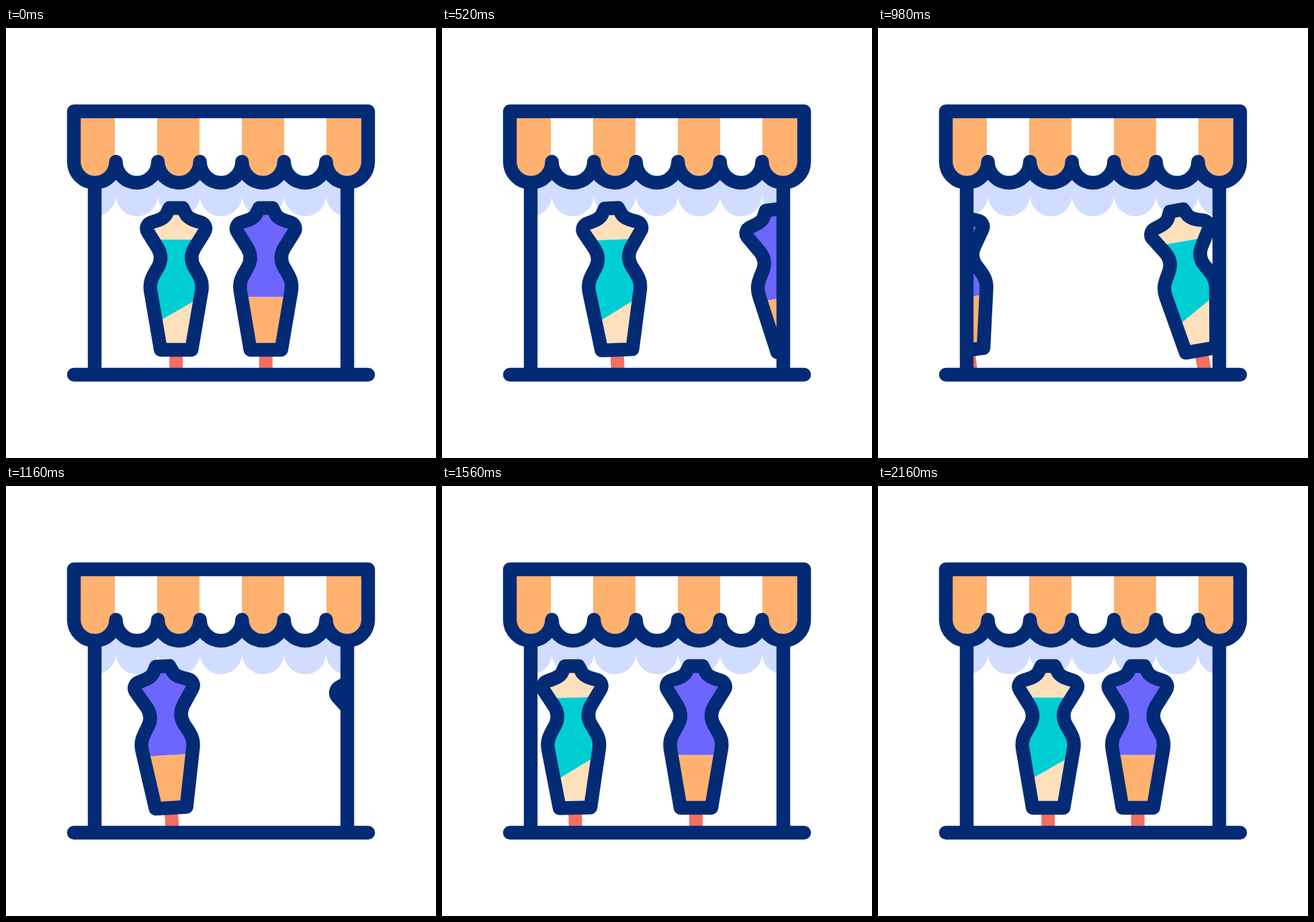
An HTML page that plays this animation: 640x640 px, repeating every 2.4 s.

```html
<!DOCTYPE html>
<html lang="en">
<head>
<meta charset="utf-8">
<title>Shop window</title>
<style>
  html, body { margin: 0; width: 100%; height: 100%; overflow: hidden; background: #fff; }
  svg { display: block; width: 100%; height: 100%; }
  .line { fill: none; stroke: #032b75; stroke-width: 20.4; stroke-linejoin: round; stroke-linecap: round; }
</style>
</head>
<body>
<svg viewBox="0 0 640 640">
  <defs>
    <path id="body" d="M-10 268H10L14 276C17 283 25 286 36 289C43 291 46 298 42 304L27 328C22 337 22 347 27 356C36 371 40 378 38 391L23 479H-23L-38 391C-40 378 -36 371 -27 356C-22 347 -22 337 -27 328L-42 304C-46 298 -43 291 -36 289C-25 286 -17 283 -14 276Z"/>
    <clipPath id="skin"><use href="#body"/></clipPath>
    <clipPath id="window"><rect x="132" y="200" width="376" height="316"/></clipPath>
  </defs>
  <g clip-path="url(#window)">
    <path id="shade" fill="#d0ddff"/>
    <g id="violet">
      <path fill="#f26f61" d="M-10 480h20v40h-20z"/>
      <g clip-path="url(#skin)">
        <path fill="#6c66fc" d="M-60 250H60V400.500H-60z"/>
        <path fill="#ffb170" d="M-60 400.500H60V490H-60z"/>
      </g>
      <use href="#body" class="line"/>
    </g>
    <g id="teal">
      <path fill="#f26f61" d="M-10 480h20v40h-20z"/>
      <g clip-path="url(#skin)">
        <path fill="#ffe0bd" d="M-60 250H60V490H-60z"/>
        <path fill="#00ced4" d="M-40 315H40V399L-40 444.500z"/>
      </g>
      <use href="#body" class="line"/>
    </g>
  </g>
  <path class="line" d="M132 235V516M508 235V516M101 516H539"/>
  <path id="canopy" fill="#fff"/>
  <path id="stripes" fill="#ffb170"/>
  <path id="edge" class="line"/>
</svg>
<script>
  const el = id => document.getElementById(id);
  const step = 438 / 7, r = step / 2;

  // Awning outline with seven scallops hanging from the given height
  const awning = y => `M101 124H539V${y}` + `a${r} ${r} 0 0 1 ${-step} 0`.repeat(7) + 'Z';
  el('shade').setAttribute('d', awning(249));
  el('canopy').setAttribute('d', awning(199));
  el('edge').setAttribute('d', awning(199));
  el('stripes').setAttribute('d', [0, 1, 2, 3].map(i =>
    `M${99 + 126 * i} 124h63v75a31.5 31.5 0 0 1 -63 0z`).join(''));

  function smooth(p) {
    p = Math.min(1, Math.max(0, p));
    return p * p * (3 - 2 * p);
  }

  // Slides out to the right, then comes back in from the left and brakes
  function pose(id, home, t, entryTime) {
    let shift, tilt;
    if (t < 930) {
      shift = 347 * smooth((t - 140) / 880);
      tilt = 10 * smooth(t / 720);
    } else {
      shift = -0.000489 * Math.max(0, 1695 - entryTime) ** 2;
      tilt = 7.3 * (1 - smooth((t - 905) / 490));
    }
    el(id).setAttribute('transform', `translate(${home + shift} 0) rotate(${-tilt} 0 506)`);
  }

  function draw() {
    const t = performance.now() % 2400;
    pose('violet', 386.7, t, t);
    pose('teal', 253.2, t - 300, t - 200);
    requestAnimationFrame(draw);
  }
  draw();
</script>
</body>
</html>
```
